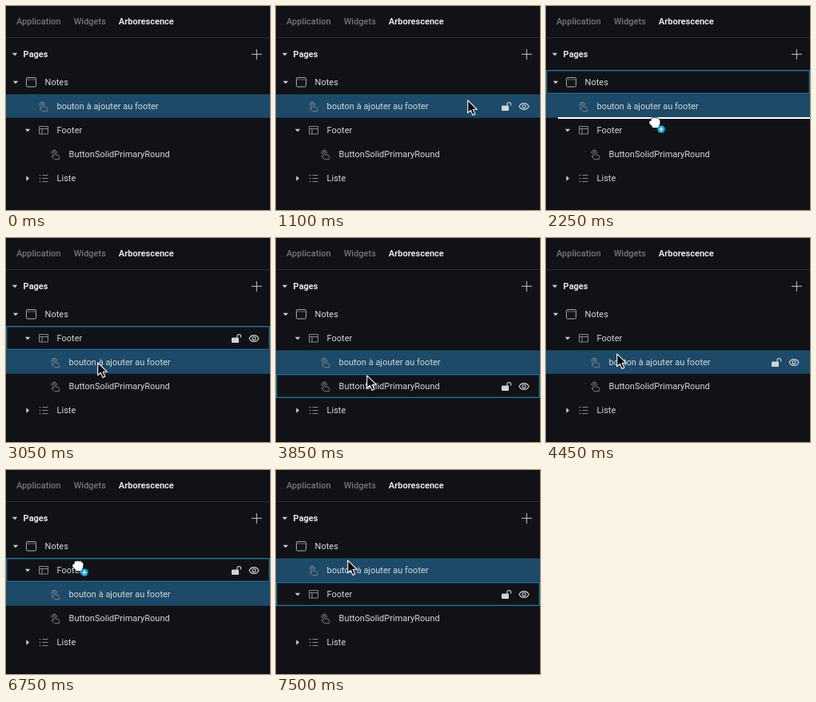
An HTML page for the animation above (8000 ms loop, 330 px wide and 255 px high).

```html
<!DOCTYPE html>
<html lang="fr">
<head>
<meta charset="utf-8">
<title>Arborescence</title>
<style>
  html, body { margin: 0; width: 100%; height: 100%; overflow: hidden; background: #111217; }
  svg { display: block; }
  text { font: 11px Roboto, sans-serif; fill: #d6d7d9; }
  .tab { font-weight: 500; fill: #76777b; }
  .strong { font-weight: 700; fill: #e4e5e6; }
  .icon { fill: none; stroke: #85888d; stroke-linejoin: round; }
  .fold { fill: #d0d1d3; }
</style>
</head>
<body>
<svg width="330" height="255" viewBox="0 0 330 255">
  <defs>
    <path id="open" class="fold" d="M-3.2-1.8h6.4L0 1.8z"/>
    <path id="closed" class="fold" d="M-1.6-3.2v6.4L2 0z"/>
    <path id="pointer" class="icon" stroke-width=".9" d="M44.2 3V-2.6a1.1 1.1 0 0 1 2.2 0V.8l4 .9q1.8.4 1.5 2l-.6 3H45.6L42 3.2q.8-1.2 2.2 0M42.2-.4a3.3 3.3 0 1 1 6.2 0"/>
  </defs>

  <text class="tab" x="13" y="23">Application<tspan dx="16">Widgets</tspan><tspan class="strong" dx="16">Arborescence</tspan></text>
  <path d="M0 39.5h330" stroke="#2a2b30"/>
  <use href="#open" x="11" y="60.5"/>
  <text class="strong" x="21.6" y="64">Pages</text>
  <path d="M307 60.3h13M313.3 54v13" stroke="#c8c9cc"/>

  <rect id="selection" width="330" height="29.4" fill="#1d4a68"/>

  <g id="notes">
    <use href="#open" x="27" y=".5"/>
    <rect class="icon" x="40.5" y="-5.5" width="12" height="11.5" rx="1.5" style="stroke:#a9abae"/>
    <path class="icon" d="M42-3h10" stroke-dasharray="1.5 1" style="stroke:#a9abae"/>
    <text x="63.6" y="4">Notes</text>
  </g>
  <g id="bouton"><use href="#pointer"/><text x="63.6" y="4">bouton à ajouter au footer</text></g>
  <g id="footer">
    <use href="#open" x="27" y=".5"/>
    <path class="icon" d="M41.5-4.5h11v9.5h-11zM41.5-1.5h11M45-1.5v6.5"/>
    <text x="63.6" y="4">Footer</text>
  </g>
  <g id="solid"><use href="#pointer"/><text x="63.6" y="4">ButtonSolidPrimaryRound</text></g>
  <g id="liste">
    <use href="#closed" x="27" y=".5"/>
    <path class="icon" d="M41.5-3.5h2M41.5.5h2M41.5 4.5h2M45.5-3.5h7M45.5.5h7M45.5 4.5h7"/>
    <text x="63.6" y="4">Liste</text>
  </g>

  <rect id="outline" x=".7" width="328.6" height="28.6" fill="none" stroke="#2380b0" stroke-width="1.2"/>
  <g id="actions" fill="none" stroke="#cfd4d8">
    <rect x="282" y="-.5" width="9" height="6.5" rx="1" fill="#cfd4d8" stroke="none"/>
    <path d="M289 0V-2.2a2.3 2.3 0 0 1 4.6 0V-.5" stroke-width="1.1"/>
    <path d="M304 .5C306.5-4.7 313.5-4.7 316 .5C313.5 5.7 306.5 5.7 304 .5z" stroke-width="1.2"/>
    <circle cx="310" cy=".5" r="2" stroke-width="1.2"/>
  </g>
  <path id="line" stroke="#fff" stroke-width="2"/>

  <path id="arrow" d="M.7.9V16.6L4.3 13.3 7 19.4 9.9 18.1 7.3 12.2H12.2z" fill="#0b0b0d" stroke="#fff" stroke-width="1.1" stroke-linejoin="round"/>
  <g id="hand">
    <path d="M-2.5 11.5V9.5L-6 6Q-6.8 1.8-3.7 2.2V0Q-2.3-2.6-.6-1Q1-2.8 2.6-.9Q4.4-2.2 5.6 0Q7.8-.2 7.8 2.5V6L6.3 9.5V11.5z" fill="#fff" stroke="#111" stroke-width=".8" stroke-linejoin="round"/>
    <circle cx="9" cy="13" r="4.8" fill="#199fd8"/>
    <path d="M6.3 13h5.4M9 10.3v5.4" stroke="#fff" stroke-width="1.2"/>
  </g>
</svg>
<script>
const LOOP = 8000, STEP = 100, ROW = 30, TOP = 80;
const ENTER = 650, DROP_IN = 3050, DROP_OUT = 7500, DROP_GLOW = 650, EDGE = 5;
const $ = id => document.getElementById(id);

// Cursor glides, each easing out toward its end point
const glides = [
  { from: 650, to: 850, x: 281, y: 116 },
  { from: 1100, to: 1600, x: 154, y: 119 },
  { from: 1950, to: 2250, x: 135, y: 141 },
  { from: 2300, to: 2300, x: 136, y: 145 },
  { from: 2450, to: 2550, x: 114, y: 155 },
  { from: 3850, to: 4050, x: 112, y: 182 },
  { from: 4150, to: 4250, x: 107, y: 169 },
  { from: 4450, to: 4450, x: 88, y: 144 },
  { from: 6350, to: 6750, x: 89, y: 115 },
  { from: 6850, to: 7350, x: 89, y: 112 }
];

function cursorAt(t) {
  let x = 311, y = 116;
  for (const g of glides) {
    if (t < g.from) break;
    const steps = Math.floor((g.to - g.from) / STEP) + 1;
    const done = Math.min(steps, Math.floor((t - g.from) / STEP) + 1);
    const k = 1 - (1 - done / steps) ** 2.2;
    x += (g.x - x) * k;
    y += (g.y - y) * k;
  }
  return [Math.round(x), Math.round(y)];
}

// The hovered row, and the insertion edge when dragging close to a row border
function targetAt(t, y, order, nested, dragging) {
  if (t < ENTER) return {};
  const sinceDrop = t - (t < DROP_OUT ? DROP_IN : DROP_OUT);
  if (sinceDrop >= 0 && sinceDrop < DROP_GLOW) return { hover: 'footer' };
  const edge = TOP + Math.round((y - TOP) / ROW) * ROW;
  if (dragging && Math.abs(y - edge) < EDGE) {
    const inside = nested && edge > TOP + ROW;
    return { hover: inside ? 'footer' : 'notes', edge, indent: inside ? 30 : 15 };
  }
  return { hover: order[Math.floor((y - TOP) / ROW)] };
}

const place = (id, x, y) => $(id).setAttribute('transform', `translate(${x} ${y})`);
const show = (id, on) => $(id).style.display = on ? '' : 'none';

function draw(t) {
  const nested = t >= DROP_IN && t < DROP_OUT;
  const dragging = t >= 1950 && t < DROP_IN || t >= 6200 && t < DROP_OUT;
  const order = ['notes', ...(nested ? ['footer', 'bouton'] : ['bouton', 'footer']), 'solid', 'liste'];
  const topOf = id => TOP + order.indexOf(id) * ROW;
  const indentOf = id => id === 'notes' ? -15 : id === 'solid' || id === 'bouton' && nested ? 15 : 0;
  for (const id of order) place(id, indentOf(id), topOf(id) + ROW / 2);
  $('selection').setAttribute('y', topOf('bouton') + .3);

  const [x, y] = cursorAt(t);
  const { hover, edge, indent } = targetAt(t, y, order, nested, dragging);
  show('outline', hover && hover !== 'bouton');
  show('actions', hover && hover !== 'notes');
  if (hover) {
    $('outline').setAttribute('y', topOf(hover) + .7);
    place('actions', 0, topOf(hover) + ROW / 2);
  }
  show('line', edge);
  if (edge) $('line').setAttribute('d', `M${indent} ${edge}H330`);

  place('arrow', x, y);
  place('hand', x, y);
  show('arrow', hover && !dragging);
  show('hand', dragging);
}

function tick() {
  draw(performance.now() % LOOP);
  requestAnimationFrame(tick);
}
tick();
</script>
</body>
</html>
```
